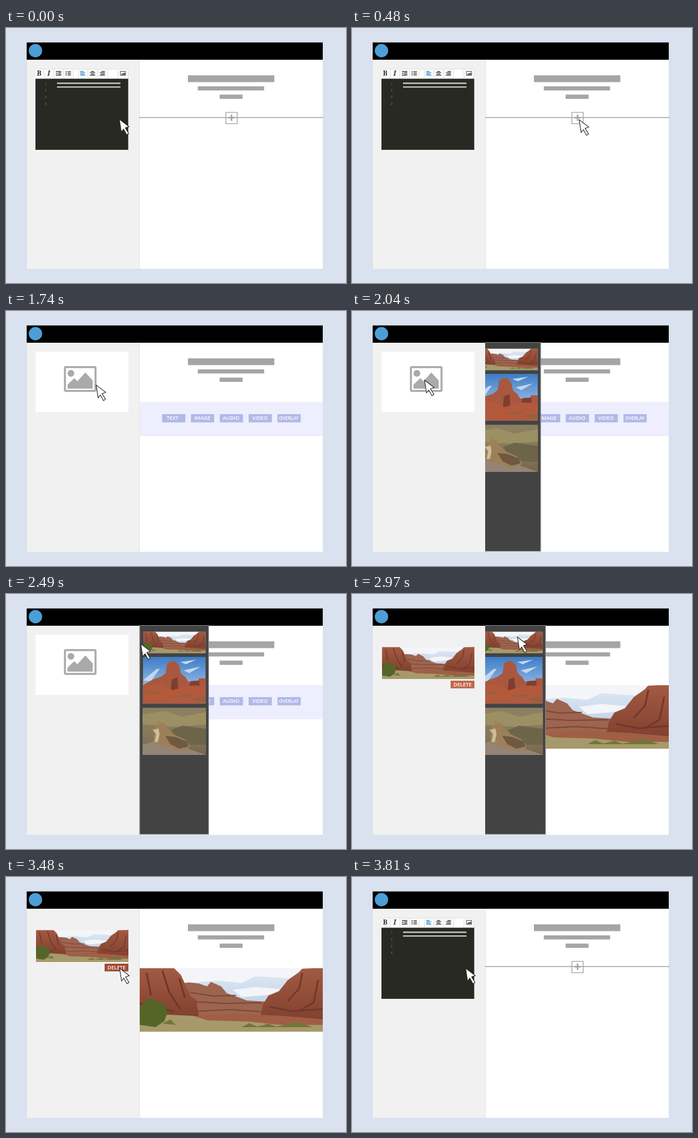
These frames come from a looping animation (600x450 px, 4110 ms). An HTML page:

```html
<!DOCTYPE html>
<html lang="en">
<head>
<meta charset="utf-8">
<title>Media picker</title>
<style>
  html, body { margin: 0; width: 100%; height: 100%; overflow: hidden; background: #d9e2ee; }
  svg { display: block; }
  .label { font: 600 9.1px "Open Sans", sans-serif; fill: #fff; text-anchor: middle; }
  .serif { font: bold 12px "Noto Serif", serif; fill: #333; text-anchor: middle; }
  .num { font: 5px "Noto Sans Mono", monospace; fill: #85857c; }
</style>
</head>
<body>
<svg width="600" height="450" viewBox="0 0 600 450">
  <defs>
    <linearGradient id="haze" x2="0" y2="1"><stop stop-color="#e3eaf3"/><stop offset=".55" stop-color="#c3d5eb"/></linearGradient>
    <linearGradient id="blue" x2="0" y2="1"><stop stop-color="#3e7cc6"/><stop offset=".7" stop-color="#9dbfe6"/></linearGradient>
    <linearGradient id="scrub" x2="0" y2="1"><stop stop-color="#8d8163"/><stop offset=".6" stop-color="#85785a"/><stop offset="1" stop-color="#77664f"/></linearGradient>
    <linearGradient id="cliff" x2="0" y2="1"><stop stop-color="#a45a43"/><stop offset="1" stop-color="#7d3f2d"/></linearGradient>

    <symbol id="canyon" viewBox="0 0 324 112" preserveAspectRatio="none">
      <path fill="url(#haze)" d="M0 0h324v112H0z"/>
      <path fill="#f3f5f8" d="M60 0h230l-25 18-60 -4-25 12-40 -4-60 4zM165 38l40-5 45 4-20 10-50 4z"/>
      <path fill="#9d6450" d="M72 27l15-2 18 2 14 5 7-8 18 8 10 12 36 13 34 2v40H80z"/>
      <path fill="none" stroke="#7a4636" stroke-width="2" d="M90 43l40 6 40-1M95 59l55 3 66-1M100 76l60-3 60 4"/>
      <path fill="url(#cliff)" d="M0 0h61l12 12 10 22 8 16 9 6 6 36H0z"/>
      <path fill="none" stroke="#6d3628" stroke-width="3" d="M12 8l8 40M40 4l12 38 20 30M70 18l10 34M0 62l60 14"/>
      <path fill="url(#cliff)" d="M212 94l6-30 10-16 18-7 16-20 20-14 5-6 37-2v101z"/>
      <path fill="none" stroke="#72372a" stroke-width="3" d="M288 8l-6 28-20 22M316 20l-8 40-26 16M230 68l40 8 54-4"/>
      <path fill="#a05f45" d="M100 84l70-4 80 4 74 6v10H90z"/>
      <path fill="#a69a6c" d="M0 92l50-10 45 2 25 8 70 2 60 6 74 0v12H0z"/>
      <path fill="#727639" d="M180 104l14-7 14 6 20-5 14 5 40-8 24 9zM40 98l14-8 10 10z"/>
      <path fill="#536628" d="M0 100l1-32 8-9 8-7 13 7 13 4 6 14-5 16-16 11z"/>
    </symbol>

    <symbol id="butte" viewBox="0 0 111 83" preserveAspectRatio="none">
      <path fill="url(#blue)" d="M0 0h111v83H0z"/>
      <path fill="#c2d7f0" d="M0 42l24-20 6-1-16 22zM72 24l30-7-20 12zM66 9l28-4-18 8z"/>
      <path fill="#a9583f" d="M2 49l16-9 14-5 8-6 3-18 8-4 7 1 6 7 3 14 8 7 5 8 18-2 1-4 12 0v20H0z"/>
      <path fill="#7e3f30" d="M51 40l10-4 2 24-14 2zM84 43l16-1v9H82z"/>
      <path fill="#b3593c" d="M0 50l32-1 20 10 28-8 31 2v30H0z"/>
      <path fill="#8d6342" d="M0 61l30 2-12 3zM50 70l40-4-14 6zM84 76l27-6v10z"/>
    </symbol>

    <symbol id="animal" viewBox="0 0 112 84" preserveAspectRatio="none">
      <path fill="url(#scrub)" d="M0 0h112v84H0z"/>
      <path fill="#9c8f63" d="M0 12l40-6 30 10 42-8v22l-50 4-62-4z"/>
      <path fill="#6d6549" d="M50 40l20-8 42 6v28H70z"/>
      <path fill="#938476" d="M0 66l22-7 30 8 34 8 26 9H0z"/>
      <path fill="#9d8058" d="M16 39l11-7 1-10 5 6 5-1 4 8 12 12 20 9 10 12-4 6-20 2-26-9-12-3-3-12 2-10z"/>
      <path fill="#6f5940" d="M40 50l18 2 20 8 3 9-16 4-16-8z"/>
      <path fill="#cfbd9c" d="M18 40l10-3 2 10-3 14-6 0 3-14z"/>
    </symbol>

    <clipPath id="workspace"><path d="M235 55h325v370H235z"/></clipPath>
    <clipPath id="slot"><rect id="slotBox" x="235" width="325"/></clipPath>
  </defs>

  <path fill="#fff" d="M37 56h522v369H37z"/>
  <path fill="#f1f1f1" d="M37 56h198.5v369H37z"/>
  <path fill="#e4e4e4" d="M235 56h1v369h-1z"/>
  <path d="M36.500 25.500h522.500v30.500H36.500z"/>
  <circle cx="52" cy="40" r="11.800" fill="#4c9fd6"/>
  <path fill="#a5a5a5" d="M321 83.500h152.500v12H321zM338.500 103h117v7.300h-117zM377 117.500h40.500v7.500H377z"/>

  <g id="adder" stroke="#a0a0a0" fill="#fff">
    <path stroke-width="1.300" d="M235 158h325M388 148.800h20v20h-20z"/>
    <path stroke-width="2.600" d="M392.500 158.300h11M398 152.800v11"/>
  </g>

  <g id="options" clip-path="url(#slot)">
    <path fill="#efeefe" d="M236 160.500h323v60.500H236z"/>
  </g>

  <g id="placeholder">
    <path fill="#fff" d="M52 72h164v106H52z"/>
    <rect x="104" y="99" width="54" height="42" rx="1.500" fill="none" stroke="#aaa" stroke-width="3.500"/>
    <circle cx="114.500" cy="110" r="6" fill="#aaa"/>
    <path fill="#aaa" d="M108.500 137v-7l12-11.500 5.500 5.500 14-15.500 13 14v14.500z"/>
  </g>

  <g id="chosen">
    <use href="#canyon" x="236" y="161" width="323" height="112"/>
    <use href="#canyon" x="53" y="93.500" width="163" height="56.500"/>
    <path id="remove" d="M174 153h42v13.500h-42z"/>
    <text class="label" x="195" y="163">DELETE</text>
  </g>

  <g id="editor">
    <path fill="#fafafa" d="M52 72h164v17.500H52z"/>
    <path fill="#fff" d="M118.500 72h9v17h-9zM179.500 72h18v17h-18z"/>
    <path stroke="#e0e0e0" fill="none" d="M52 72.500h163.500v17M67.500 72v17M84.500 72v17M101.500 72v17M118.500 72v17M127.500 72v17M144.500 72v17M161.500 72v17M179.500 72v17M197.500 72v17"/>
    <text class="serif" x="58.500" y="84">B</text>
    <text class="serif" x="75.500" y="84" font-style="italic" style="font-style:italic">I</text>
    <g fill="none" stroke="#444" stroke-width="1.400">
      <path d="M88 76.700h9.500M92 78.900h5.500M92 81.100h5.500M88 83.300h9.500M88 80h3"/>
      <path d="M105 77.200h2M108.500 77.200h6M105 80h2M108.500 80h6M105 82.800h2M108.500 82.800h6"/>
      <path stroke="#3d97d3" d="M131 76.700h6M131 78.900h9M131 81.100h7M131 83.300h9"/>
      <path d="M150 76.700h5.500M148 78.900h9.500M150 81.100h5.500M148 83.300h9.500"/>
      <path d="M168.500 76.700h6M165.500 78.900h9M167.500 81.100h7M165.500 83.300h9"/>
      <path stroke-width="1" d="M202 76.500h9v7h-9z"/>
    </g>
    <path fill="#444" d="M203 82.500l2-2.500 1.500 1 2-2.500 2 2v2z"/>
    <path fill="#282923" d="M52 89.500h163.700V215H52z"/>
    <path fill="#c6c6c2" d="M90 96.300h112v2.400H90zM90 102.900h112v2.400H90z"/>
  </g>

  <g clip-path="url(#workspace)">
    <g id="drawer">
      <path fill="#434343" stroke="#8a8a8a" stroke-width="1.200" d="M236 55.500h121.500V424H236z"/>
      <use href="#canyon" x="242" y="66.500" width="110.500" height="38"/>
      <use href="#butte" x="241.500" y="111" width="111" height="82.500"/>
      <use href="#animal" x="241" y="200.500" width="112" height="83.500"/>
    </g>
  </g>

  <path id="cursor" fill="#fff" stroke="#222" stroke-width="1.100" d="M0 0L17 13 10.500 15.200 16.500 25 13 27.500 7.500 17.500 3.500 22.500z"/>
</svg>
<script>
const LOOP = 4110, STEP = 30;
const $ = id => document.getElementById(id);

function addText(parent, x, y, cls, content, size) {
  const node = document.createElementNS("http://www.w3.org/2000/svg", "text");
  node.setAttribute("x", x);
  node.setAttribute("y", y);
  node.setAttribute("class", cls);
  if (size) node.style.fontSize = size + "px";
  node.textContent = content;
  parent.append(node);
}

["TEXT", "IMAGE", "AUDIO", "VIDEO", "OVERLAY"].forEach((name, i) => {
  const x = 275.5 + 50.9 * i;
  $("options").insertAdjacentHTML("beforeend",
    `<rect x="${x}" y="182" width="41" height="14.500" fill="#b1b9e8"/>`);
  addText($("options"), x + (i ? 20 : 18.5), 192.3, "label", name, i === 4 ? 8 : 9.1);
});
for (let i = 0; i < 4; i++) addText($("editor"), 68.5, 99.5 + 12 * i, "num", i + 1);

// Smooth 0..1 progress between two times
function ramp(t, from, to) {
  const p = Math.min(1, Math.max(0, (t - from) / (to - from)));
  return p * p * (3 - 2 * p);
}

// Cursor moves along quadratic curves
const moves = [
  { from: 0, to: 540, path: [[200, 161], [304, 161], [408, 162]] },
  { from: 560, to: 1080, path: [[408, 162], [379, 173], [350, 184]] },
  { from: 1350, to: 1860, path: [[350, 184], [239, 153], [128, 122]] },
  { from: 2250, to: 2640, path: [[128, 122], [210, 92], [292, 76]] },
  { from: 3240, to: 3480, path: [[292, 76], [296, 155], [200.5, 161]] },
];

function cursorAt(t) {
  const { from, to, path: [a, b, c] } = moves.findLast(m => m.from <= t);
  const s = ramp(t, from, to), r = 1 - s;
  return a.map((v, i) => r * r * v + 2 * r * s * b[i] + s * s * c[i]);
}

function draw(now) {
  const t = Math.floor((now % LOOP) / STEP) * STEP;
  const reset = ramp(t, 3630, 3810);
  const picked = ramp(t, 2730, 2850);
  const opened = ramp(t, 555, 720);
  const drawerShown = ramp(t, 1890, 2100) - ramp(t, 2925, 3125);
  const fade = (id, value) => $(id).setAttribute("opacity", value);

  fade("editor", 1 - ramp(t, 1080, 1200) + reset);
  fade("placeholder", t >= 1080 ? 1 - picked : 0);
  fade("chosen", picked - reset);
  fade("adder", t < 570 ? 1 : reset);
  fade("options", 1 - picked);
  $("slotBox").setAttribute("y", 160);
  $("slotBox").setAttribute("height", 61 * opened);
  $("remove").setAttribute("fill", t >= 3450 ? "#a34b35" : "#c2664b");
  $("drawer").setAttribute("transform", `translate(${-124 * (1 - drawerShown)})`);
  $("cursor").setAttribute("transform", `translate(${cursorAt(t)})`);
  requestAnimationFrame(draw);
}
draw(performance.now());
</script>
</body>
</html>
```
